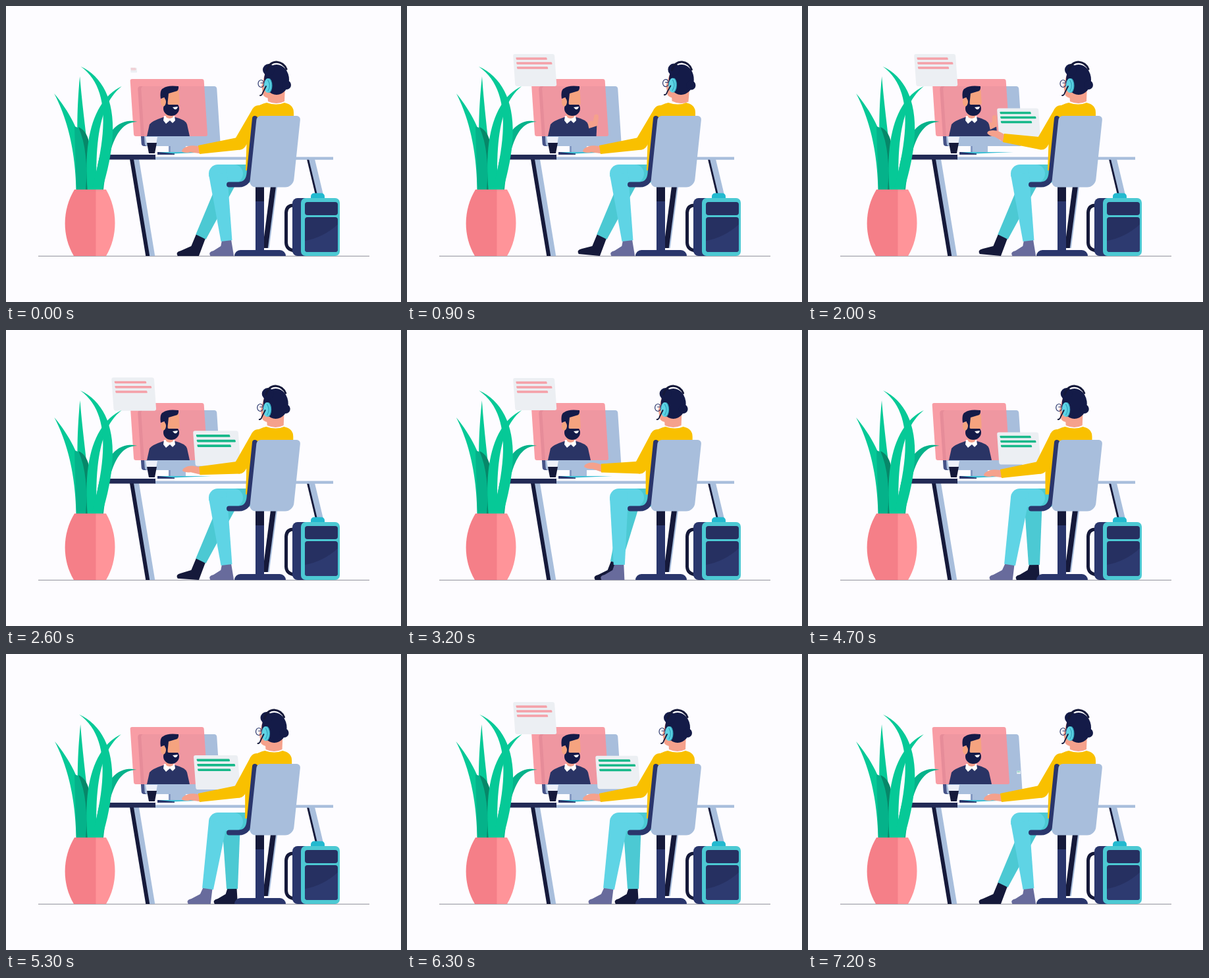
Recreate the animation shown at these times as an HTML page with a canvas. Size 600x450 px, loop 7.3 s.

```html
<!DOCTYPE html>
<html lang="en">
<head>
<meta charset="utf-8">
<title>Video call</title>
<style>
html, body { margin: 0; width: 100%; height: 100%; overflow: hidden; background: #fdfcff; }
canvas { display: block; width: 600px; height: 450px; }
</style>
</head>
<body>
<canvas id="stage" width="600" height="450"></canvas>
<script>
const ctx = document.getElementById('stage').getContext('2d');
const LOOP = 7300, FLOOR = 380;
const NAVY = '#2a366c', INK = '#15193a', HAIR = '#141b48', STEEL = '#a8bedc',
      SKIN = '#f5a18c', YELLOW = '#f9c000', AQUA = '#5fd4e5', TEAL = '#4cc9d3',
      LEAF = '#06c997', LEAF_MID = '#05b28a', LEAF_DARK = '#078769';

const clamp = p => Math.max(0, Math.min(1, p));
const smooth = p => p * p * (3 - 2 * p);
const mix = (a, b, p) => a + (b - a) * p;

// 0, easing to 1 from time `on`, easing back to 0 from time `off`.
const pulse = (t, on, off, rise, fall = rise) =>
  smooth(clamp((t - on) / rise)) - smooth(clamp((t - off) / fall));

// Scale of something that pops in and out, overshooting at both ends.
function pop(t, on, off) {
  const back = p => p * p * (2.7 * p - 1.7);
  return (1 - back(1 - clamp((t - on) / 380))) * (1 - back(clamp((t - off) / 300)));
}

function shape(color, d) {
  ctx.fillStyle = color;
  ctx.fill(new Path2D(d));
}

function line(color, width, d) {
  ctx.strokeStyle = color;
  ctx.lineWidth = width;
  ctx.lineCap = ctx.lineJoin = 'round';
  ctx.stroke(new Path2D(d));
}

function oval(color, x, y, rx, ry = rx) {
  ctx.fillStyle = color;
  ctx.beginPath();
  ctx.ellipse(x, y, rx, ry, 0, 0, Math.PI * 2);
  ctx.fill();
}

// Rounded box whose lower edge slides sideways by `slant` per pixel of height.
function box(color, x, y, w, h, r = 0, slant = 0) {
  ctx.save();
  ctx.transform(1, 0, slant, 1, x, y);
  ctx.fillStyle = color;
  ctx.beginPath();
  ctx.roundRect(0, 0, w, h, r);
  ctx.fill();
  ctx.restore();
}

function group(draw, x, y, turn = 0, size = 1) {
  ctx.save();
  ctx.translate(x, y);
  ctx.rotate(turn);
  ctx.scale(size, size);
  draw();
  ctx.restore();
}

// Tapered tube through joints { x, y, r }, cut flat at the last one.
function limb(color, ...joints) {
  for (let i = 1; i < joints.length; i++) {
    const a = joints[i - 1], b = joints[i];
    const length = Math.hypot(b.x - a.x, b.y - a.y);
    const nx = (a.y - b.y) / length, ny = (b.x - a.x) / length;
    oval(color, a.x, a.y, a.r);
    ctx.beginPath();
    for (const [j, side] of [[a, 1], [b, 1], [b, -1], [a, -1]])
      ctx.lineTo(j.x + nx * j.r * side, j.y + ny * j.r * side);
    ctx.fill();
  }
}

function desk() {
  box(INK, 188, 233, 8, 147, 0, .165);
  box(STEEL, 194, 233, 8, 147, 0, .165);
  box(STEEL, 406, 274, 6, 94, 0, -.13);
  box(INK, 402, 274, 8, 94, 0, -.13);
  box(INK, 457, 233, 8, 56, 0, .24);
  box(STEEL, 460, 233, 9, 56, 0, .24);
  box(STEEL, 226, 229.5, 271, 4.3);
  box('#222a55', 150, 226, 77, 7.5);
}

function monitor() {
  box('#8499c2', 247, 212, 26, 11);
  box(STEEL, 250, 212, 23, 11);
  box('#465388', 200, 122, 118, 91, 4, .065);
  box(STEEL, 205, 122, 115, 91, 4, .065);
  box('rgba(248, 147, 156, .9)', 188.5, 111, 112, 87, 3, .066);
}

function caller(t) {
  const lift = pulse(t, 350, 1950, 450);
  if (lift > .01) {
    ctx.save();
    ctx.beginPath();
    ctx.rect(200, 120, 106, 78);
    ctx.clip();
    group(() => {
      limb(SKIN, { x: -5, y: -17, r: 6 }, { x: -3, y: -7, r: 5 });
      limb(SKIN, { x: 1, y: -30, r: 3.5 }, { x: 0, y: -12, r: 4 });
      shape(NAVY, 'M-9 -11L3 -16L4 12H-13Z');
    }, 284, 198 + 45 * (1 - lift), .09 * Math.sin(t / 110) * lift);
    ctx.restore();
  }
  shape('#2a3465', 'M214 198L218 180Q221 175 239 169H257Q273 173 275 180L279 198Z');
  shape('#fff', 'M240 167H256L257 174L253 178L249 174L243 179L239 174Z');
  box(SKIN, 242, 155, 13, 16, [0, 0, 6, 6]);
  oval(HAIR, 251, 156, 12, 11);
  box('#f5a37f', 244, 127, 18.5, 23, 2, .06);
  shape(HAIR, 'M235 141Q233 127 239 125Q245 120 262 122Q263 129 257 130L247 133L245 152H241V139Z');
  oval('#f5a37f', 239, 146, 4, 6.5);
  shape('#fff', 'M253 154L261 153Q260 158 256 157Z');
}

function deskItems() {
  box(NAVY, 230, 222, 26, 4);
  shape('#3ebfd4', 'M232 222H312L256 224.500Z');
  shape('#edf0f9', 'M212 199H230L228 210H214Z');
  shape(INK, 'M214 208H229L226 224H217Z');
}

function backpack() {
  line(INK, 5, 'M437 303Q426 303 425.500 314V360Q426 370 437 372');
  box('#22b9cf', 463, 284.5, 21, 16, 5);
  box(NAVY, 435, 292, 40, 88, 8);
  box(TEAL, 448, 292, 59, 88, 7);
  box('#263061', 454, 298, 50, 20, 4);
  box('#263061', 454, 321, 50, 53, 4);
  shape('#2d3a70', 'M454 357Q482 352 504 332V370Q504 374 500 374H458Q454 374 454 370Z');
}

function bubble(x, y, size, color) {
  if (size < .01) return;
  group(() => {
    box('#eceff3', -33, -24.5, 63, 49, 3, .07);
    [47, 54, 47].forEach((width, i) => box(color, -28.8 + i * .7, -19.2 + i * 7, width, 3.4, 1, .25));
  }, x, y, 0, size);
}

// Sole and toe follow the slant of the shin.
function boot(color, knee, ankle, toeLift) {
  const slant = (ankle.x - knee.x) / 100;
  const { x, y } = ankle, tilt = -slant * 7;
  const toe = x - 30 + 18 * slant, heel = x + 8 + 24 * slant;
  shape(color, `M${x - 7} ${y - 1 + Math.min(0, -tilt)}L${x + 7} ${y - 1 + tilt}L${heel} ${FLOOR}L${toe + 3} ${FLOOR - toeLift}` +
    `Q${toe - 1} ${374 - toeLift} ${toe + 8} ${372 - toeLift}L${x - 10 + 10 * slant} 365Z`);
}

function legs(t) {
  const open = pulse(t, 2830, 6400, 800);
  const legPose = (kneeX, fromX, fromY, toX) => [
    { x: 366, y: 255, r: 14 },
    { x: kneeX, y: 255, r: 14 },
    { x: mix(fromX, toX, open), y: mix(fromY, 357, open), r: 8.5 }
  ];
  const far = legPose(342, 296, 351, 343.5), near = legPose(322, 335, 357, 306.5);
  boot(INK, far[1], far[2], 3 * pulse(t, 0, 2400, 600));
  limb(TEAL, ...far);
  boot('#686b9c', near[1], near[2], 0);
  limb(AQUA, { ...near[0], x: 346 }, ...near.slice(1));
}

function head(glance, follow) {
  group(() => {
    shape(SKIN, 'M-15 -24H13L12 1Q0 7 -13 1Z');
    shape(SKIN, 'M-18 -40L-23 -22L-20 -8Q-14 -1 -3 -6V-41Z');
    line(NAVY, 1.2, 'M-28 -26A4.500 5.500 0 1 1 -19 -26A4.500 5.500 0 1 1 -28 -26M-24 -27H-13');
    oval(HAIR, 0, -32, 19, 23);
    oval(HAIR, -12, -47, 9, 9);
    oval(HAIR, 15, -24, 7);
    line(INK, 3, 'M-15 -46Q-11 -59 0 -59Q11 -58 15 -48');
    oval('#38acc4', -11.5, -23, 5, 11);
    oval(AQUA, -13.5, -23, 5.5, 11);
    line('#38acc4', 1.5, 'M-13 -31Q-8 -23 -13 -15');
    line(INK, 1.8, 'M-16 -22L-21 -12Q-22 -8 -25 -8');
  }, 411 + 4.5 * glance - 7 * follow, 144, .04 * glance);
}

function person(t) {
  const glance = pulse(t, 250, 1200, 500);
  const lean = glance - 6.2 * pulse(t, 2200, 4300, 1900);
  const raise = pulse(t, 1250, 2300, 450) + 1.1 * pulse(t, 2950, 4150, 550);
  legs(t);
  head(glance, pulse(t, 2300, 4300, 1100, 2000));
  shape(YELLOW, 'M366 195L373 250H364Z');
  group(() => shape(YELLOW, 'M373 163Q376 152 396 147Q411 152 423 147Q437 150 437 162V182L420 250H366V195Z'), lean, 0);

  const shoulder = { x: 384 + lean, y: 162, r: 11 };
  const elbow = { x: 355 + lean * .3, y: 209, r: 9.5 };
  const wrist = { x: 293 + 4 * raise, y: 218.5 - 18 * raise, r: 6.5 };
  group(() => shape(SKIN, 'M4 -5L-9 -6Q-18 -6 -24 -1Q-27 2 -25 4Q-20 6 -13 4L4 6Z'),
    wrist.x, wrist.y, .02 + .4 * raise);
  limb(YELLOW, shoulder, elbow, wrist);
}

function chair() {
  box(INK, 379, 273, 13, 25);
  box(NAVY, 379, 297, 13, 76);
  box(NAVY, 347, 371, 78, 9, [9, 9, 0, 0]);
  line(NAVY, 8, 'M378 171L369.500 255Q368 271 354 271.500H339');
  box(STEEL, 381, 167, 66.5, 108.5, [6, 6, 12, 9], -.105);
}

// Blade along a curve from tip to base, widening away from the tip.
function leaf(color, sway, tipX, tipY, bendX, bendY, baseX, width) {
  const left = [], right = [], steps = 24, baseY = 282;
  const curve = (a, b, c, u) => mix(mix(a, b, u), mix(b, c, u), u);
  const tip = tipX + sway, bend = bendX + sway * .4;
  for (let i = 0; i <= steps; i++) {
    const u = i / steps, w = width * Math.sin(u * 1.9);
    const x = curve(tip, bend, baseX, u), y = curve(tipY, bendY, baseY, u);
    const dx = mix(bend - tip, baseX - bend, u), dy = mix(bendY - tipY, baseY - bendY, u);
    const n = w / Math.hypot(dx, dy);
    left.push([x - dy * n, y + dx * n]);
    right.unshift([x + dy * n, y - dx * n]);
  }
  ctx.fillStyle = color;
  ctx.beginPath();
  for (const [x, y] of left.concat(right)) ctx.lineTo(x, y);
  ctx.fill();
}

function plant(t) {
  const s = Math.cos(Math.PI * 6 * (t + 220) / LOOP);
  leaf(LEAF, -s, 113, 107, 112, 195, 124, 8);
  leaf(LEAF, -s, 74, 133, 117, 198, 115, 9);
  shape(LEAF_MID, 'M104 183Q121 188 127 212L126 281H107Z');
  shape(LEAF_DARK, 'M110 184Q124 190 127 212L126 281H121Q126 220 110 184Z');
  leaf(LEAF, s, 175, 122, 122, 155, 131, 7.5);
  leaf(LEAF_MID, 1.5 * s, 198.5, 176, 150, 170, 141, 7);
  leaf(LEAF, 2.6 * s, 111.5, 92, 181, 133, 137, 8);
  const side = 'C170 310 170 350 152 380H';
  shape('#f57f88', `M137 279H104C85 310 85 350 103 380H137Z`);
  shape('#ff9499', `M136.500 279H152${side}136.500Z`);
}

function draw(t) {
  ctx.fillStyle = '#fdfcff';
  ctx.fillRect(0, 0, 600, 450);
  box('#8d8d96', 49, 379.7, 503, 1);
  desk();
  monitor();
  caller(t);
  deskItems();
  const asked = pop(t, -12, 2420) + pop(t, 2770, 3480) + pop(t, 5800, 6600);
  const replied = pop(t, 1400, 2500) + pop(t, 3520, 5225) + pop(t, 6150, 6907);
  bubble(194, 97.5, asked, '#f5a0a8');
  bubble(320, 180, replied, '#16b889');
  backpack();
  person(t);
  chair();
  plant(t);
}

function frame() {
  draw(performance.now() % LOOP);
  requestAnimationFrame(frame);
}
frame();
</script>
</body>
</html>
```
